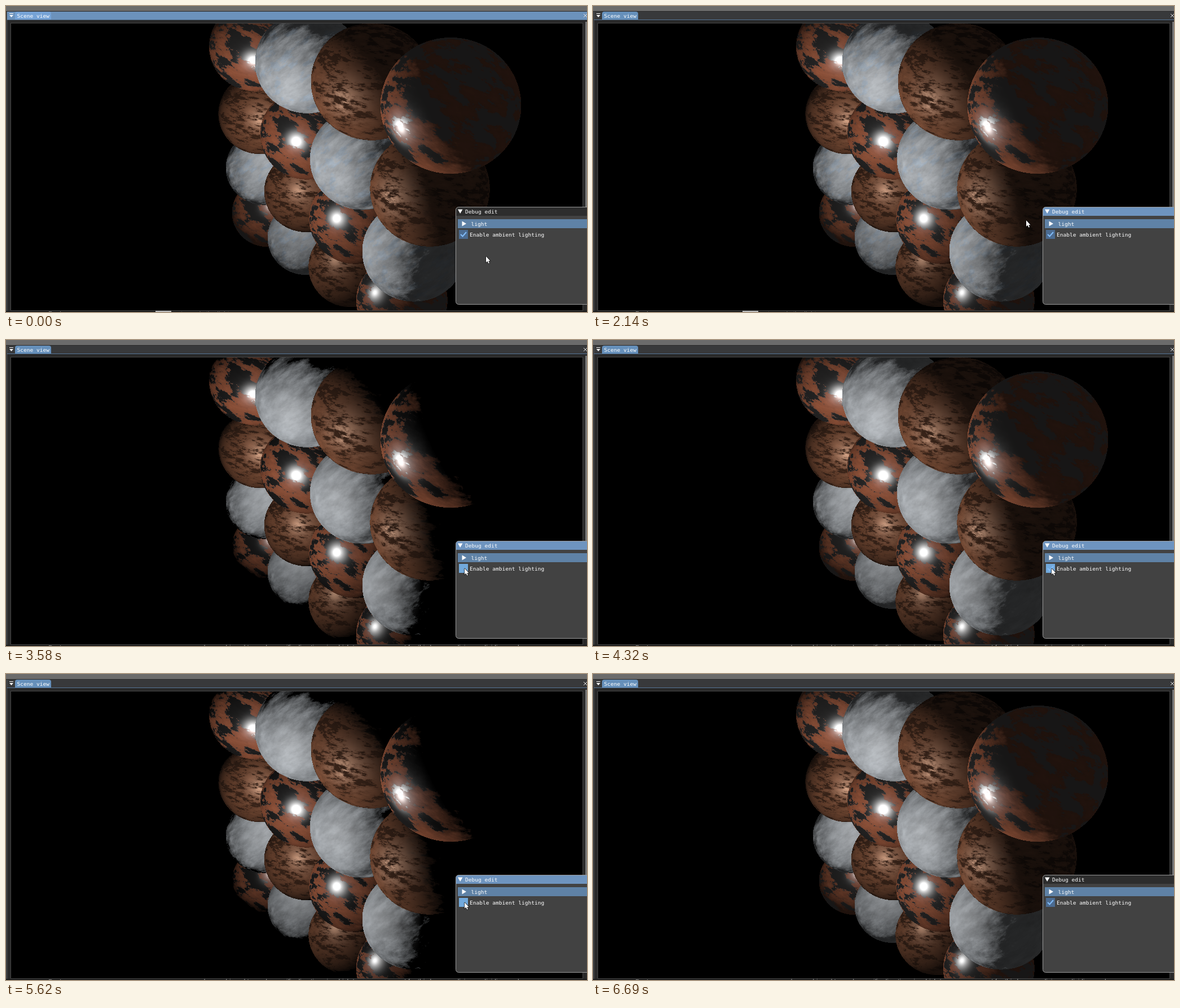
These frames come from a looping animation (1030x544 px, 6790 ms). An HTML page with a canvas:

```html
<!DOCTYPE html>
<html lang="en">
<head>
<meta charset="utf-8">
<title>Scene view</title>
<style>
html, body { margin: 0; width: 100%; height: 100%; overflow: hidden; background: #000; }
canvas { display: block; }
</style>
</head>
<body>
<canvas id="stage" width="1030" height="544"></canvas>
<script>
const W = 1030, H = 544, LOOP = 6790;
const VIEW = { left: 9, top: 31, right: 1022, bottom: 541 };
const ctx = document.getElementById('stage').getContext('2d');

// ---------- noise ----------
function hash(x, y, z) {
  let h = Math.imul(x, 374761393) + Math.imul(y, 668265263) + Math.imul(z, 1274126177) | 0;
  h = Math.imul(h ^ h >>> 13, 1274126177);
  return ((h ^ h >>> 16) >>> 0) / 4294967296;
}
const mix = (a, b, k) => a + (b - a) * k;
const clamp = v => Math.min(1, Math.max(0, v));
const smooth = (a, b, v) => { const k = clamp((v - a) / (b - a)); return k * k * (3 - 2 * k); };

function noise(x, y, z) {
  const i = Math.floor(x), j = Math.floor(y), k = Math.floor(z);
  const u = smooth(0, 1, x - i), v = smooth(0, 1, y - j), w = smooth(0, 1, z - k);
  const row = (b, c) => mix(hash(i, b, c), hash(i + 1, b, c), u);
  const slab = c => mix(row(j, c), row(j + 1, c), v);
  return mix(slab(k), slab(k + 1), w);
}
function fbm(x, y, z, octaves) {
  let sum = 0, amp = 0.5, total = 0;
  for (let o = 0; o < octaves; o++) {
    sum += amp * noise(x, y, z);
    total += amp;
    amp *= 0.64;
    x = x * 2.03 + 7; y = y * 2.03 + 3; z = z * 2.03 + 5;
  }
  return sum / total;
}

// ---------- materials ----------
const linear = (...rgb) => rgb.map(v => (v / 255) ** 2.2);
const RUST = linear(150, 86, 60), METAL = linear(112, 109, 108);
const BROWN = linear(122, 77, 54), STONE = linear(188, 193, 198), TAN = linear(235, 190, 160);
const white = v => [v, v, v];

// Each material gives base colour, diffuse factor, bump and specular at a point;
// nh is the cosine to the highlight direction.
function rustedMetal(nx, ny, nz, nh, seed) {
  const u = nx * .87 + ny * .5, v = ny * .87 - nx * .5;
  const patch = fbm(u * 2.6 + 4 + seed, v * 6.5 + 9, nz * 3 + 2, 7);
  const rust = smooth(.485, .53, patch + .09 * smooth(.5, .75, ny));
  const shine = nh ** 70 * mix(1.3, .35, rust) + .1 * nh ** 20 * patch + nh ** 300;
  return {
    base: RUST.map((c, i) => mix(METAL[i], c * (.4 + 1.1 * patch), rust)),
    diffuse: mix(.07, 1, rust), bump: (patch - .5) * .6, spec: white(shine), tint: 0
  };
}
function brownRust(nx, ny, nz, nh, seed) {
  const u = nx * .98 + ny * .17, v = ny * .98 - nx * .17;
  const grain = fbm(u * 5 + 20 + seed, v * 14 + 5, nz * 5, 6);
  const soot = smooth(.51, .6, grain - .05 * ny);
  const shine = (.25 * nh ** 16 + .45 * nh ** 100) * smooth(.62, .4, grain);
  return {
    base: BROWN.map(c => c * mix(1.7 - 1.6 * grain, .25, soot)),
    diffuse: 1, bump: (grain - .5) * .6, spec: TAN.map(c => c * shine), tint: 0
  };
}
function paleStone(nx, ny, nz, nh, seed) {
  const u = nx * .8 - ny * .6, v = ny * .8 + nx * .6;
  const streak = fbm(u * 3 + 30 + seed, v * 7 + 11, nz * 4, 6);
  return {
    base: STONE.map(c => c * (.5 + .8 * streak)), diffuse: 1, bump: (streak - .5) * 1.1,
    spec: white(.1 * nh ** 10), tint: smooth(.52, .66, fbm(u * 4 + 50, v * 9, nz * 4, 4))
  };
}
const MATERIALS = [rustedMetal, brownRust, paleStone];

// ---------- a 4 x 4 wall of spheres in perspective ----------
// The lamp's highlight drifts left over the columns and up over the rows.
function sphereAt(col, row) {
  const depth = 1 - .0888 * col + .1186 * row;
  const rx = (82 + 3.2 * col + row - .7 * col * row) / depth;
  return {
    cx: (442 + 45.5 * col + 62 * row) / depth,
    cy: (72 + 19.3 * col + (142 + 1.6 * col) * row) / depth,
    rx, ry: rx * .97,
    hx: -.05 - .22 * col + .04 * row,
    hy: .33 - .17 * row,
    power: .86 - .045 * row * row,
    seed: row * .13 + col * .21,
    material: MATERIALS[(row + 2 * col) % 3]
  };
}

// Three lightings share one pass.
const LIGHTINGS = {
  cool: { ambient: .03, tint: .045 }, unlit: { ambient: 0, tint: 0 }, lit: { ambient: .03, tint: 0 }
};
for (const lighting of Object.values(LIGHTINGS)) lighting.image = new ImageData(W, H);

function renderSphere({ cx, cy, rx, ry, hx, hy, power, seed, material }) {
  const hz = Math.sqrt(1 - hx * hx - hy * hy);
  const lx = 2 * hz * hx, ly = 2 * hz * hy, lz = 2 * hz * hz - 1;
  const x1 = Math.min(VIEW.right, cx + rx), y1 = Math.min(VIEW.bottom, cy + ry);
  for (let y = Math.max(VIEW.top, Math.floor(cy - ry)); y < y1; y++)
  for (let x = Math.floor(cx - rx); x < x1; x++) {
    const at = (y * W + x) * 4;
    if (LIGHTINGS.lit.image.data[at + 3]) continue;
    const nx = (x + .5 - cx) / rx, ny = (y + .5 - cy) / ry, rr = nx * nx + ny * ny;
    if (rr >= 1) continue;
    const nz = Math.sqrt(1 - rr);
    const m = material(nx, ny, nz, Math.max(0, nx * hx + ny * hy + nz * hz), seed);
    const facing = nx * lx + ny * ly + nz * lz - .06;
    const diffuse = clamp(facing + m.bump * smooth(1, 0, facing)) ** 1.25 * m.diffuse;
    const glint = smooth(0, .15, facing);
    for (const { ambient, tint, image } of Object.values(LIGHTINGS)) {
      for (let c = 0; c < 3; c++) {
        const value = m.base[c] * (ambient + power * diffuse) + m.spec[c] * power * glint;
        image.data[at + c] = 255 * clamp(value) ** (1 / 2.2) * (1 + (c - 1) * tint * m.tint);
      }
      image.data[at + 3] = 255;
    }
  }
}
// Nearest first: right columns, then upper rows.
for (let col = 3; col >= 0; col--)
  for (let row = 0; row < 4; row++) renderSphere(sphereAt(col, row));

for (const lighting of Object.values(LIGHTINGS)) {
  lighting.layer = document.createElement('canvas');
  lighting.layer.width = W;
  lighting.layer.height = H;
  lighting.layer.getContext('2d').putImageData(lighting.image, 0, 0);
}

// ---------- timeline ----------
// Each click toggles ambient lighting on release.
const CLICKS = [[2850, 2910], [3580, 3640], [4320, 4440], [5620, 5680]];
const MOVES = [
  { from: 680, to: 960, x: 812, y: 400 },
  { from: 1380, to: 1490, x: 811, y: 407 },
  { from: 1800, to: 2140, x: 768, y: 381 },
  { from: 2140, to: 2440, x: 812, y: 404 },
  { from: 2500, to: 2610, x: 813, y: 406 },
  { from: 5740, to: 5910, x: 953, y: 499 },
  { from: 6090, to: 6450, x: 1003, y: 546 }
];
function pointerAt(t) {
  let x = 851, y = 445;
  for (const move of MOVES) {
    const k = smooth(move.from, move.to, t);
    x = mix(x, move.x, k);
    y = mix(y, move.y, k);
  }
  return { x: Math.round(x), y: Math.round(y) };
}
function stateAt(t) {
  const clicks = CLICKS.filter(([, release]) => t >= release).length;
  return {
    pointer: pointerAt(t),
    checked: clicks % 2 === 0,
    pressed: CLICKS.some(([press, release]) => t >= press && t < release),
    lighting: clicks === 0 ? LIGHTINGS.cool : clicks % 2 ? LIGHTINGS.unlit : LIGHTINGS.lit,
    sceneFocused: t < 280,
    debugFocused: t >= 350 && t < 6630,
    scrolled: t >= 3150
  };
}

// ---------- interface ----------
function box(color, x, y, w, h) { ctx.fillStyle = color; ctx.fillRect(x, y, w, h); }
function trace(points) {
  ctx.beginPath();
  points.forEach(([x, y]) => ctx.lineTo(x, y));
}
function shape(color, points) {
  ctx.fillStyle = color;
  trace(points);
  ctx.fill();
}
function stroke(color, width, points) {
  ctx.strokeStyle = color;
  ctx.lineWidth = width;
  trace(points);
  ctx.stroke();
}
function text(content, x, y, color = '#fff', font = '9.55px "DejaVu Sans Mono", monospace') {
  ctx.font = font;
  ctx.fillStyle = color;
  ctx.fillText(content, x, y);
}
const inside = ({ x, y }, left, top, w, h) => x >= left && x < left + w && y >= top && y < top + h;

function drawSceneWindow({ sceneFocused, lighting }) {
  box('#292929', 0, 0, W, H);
  box('#6b6b6b', 0, 0, W, 9);
  box(sceneFocused ? '#6c92bb' : '#38393b', 2, 10, W, 14);
  ctx.fillStyle = sceneFocused ? '#76a3d6' : '#6690bb';
  ctx.beginPath();
  ctx.roundRect(16, 10, 64, 14, [4, 4, 0, 0]);
  ctx.fill();
  box('#567597', 2, 24, W, 1);
  box('#55595e', 1, 10, 1, 532);
  box('#fff', 6, 13, 7, 1);
  shape('#fff', [[6, 16], [13, 16], [9.5, 20]]);
  text('Scene view', 19.5, 20.5);
  stroke('#ddd', 1, [[1024, 14], [1030, 20]]);
  stroke('#ddd', 1, [[1024, 20], [1030, 14]]);
  box('#454545', 8, 30, 1015, 512);
  box('#000', VIEW.left, VIEW.top, VIEW.right - VIEW.left, VIEW.bottom - VIEW.top);
  box('#777', 1027, 28, 3, 330);
  ctx.drawImage(lighting.layer, 0, 0);
}

// Tops of page text peeking out under the window.
function drawPageEdge({ scrolled }) {
  const font = '11.8px "Liberation Sans", sans-serif';
  ctx.save();
  ctx.beginPath();
  ctx.rect(0, 542, W, 2);
  ctx.clip();
  box('#1b1b1b', 0, 542, W, 2);
  text('Back', 75, 551, '#999', font);
  if (scrolled) {
    text('samples are biased towards specific directions in which to use we account for this by normalizing or dividing each', 322, 550, '#999', font);
  } else {
    box('#bbb', 265, 542, 28, 2);
    text('towards the light', 310, 551, '#777', font);
  }
  ctx.restore();
}

function drawDebugWindow({ debugFocused, pointer, pressed, checked }) {
  ctx.beginPath();
  ctx.roundRect(797.5, 357.5, 300, 173, 5);
  ctx.save();
  ctx.clip();
  box('#424242', 797, 357, 300, 175);
  box(debugFocused ? '#6e94bf' : '#2d2d2d', 797, 357, 300, 16);
  ctx.restore();
  ctx.strokeStyle = '#999';
  ctx.lineWidth = 1;
  ctx.stroke();
  shape('#fff', [[801, 361.5], [809.5, 361.5], [805.2, 369]]);
  text('Debug edit', 814, 368.5);

  box(inside(pointer, 801, 379, 229, 16) ? '#6f9bc9' : '#5f82a6', 801, 379, 229, 16);
  shape('#fff', [[808.5, 382.5], [816, 387], [808.5, 391.5]]);
  text('light', 824.5, 390.5);

  const hovered = inside(pointer, 803, 398, 151, 16);
  box(pressed ? '#72a9dc' : hovered ? '#5f8bb8' : '#4b6b91', 803, 398, 16, 16);
  if (checked) stroke('#82bcf8', 2, [[806, 406], [809.5, 409.5], [816, 402]]);
  text('Enable ambient lighting', 822, 409.5);
}

function drawPointer({ pointer }) {
  ctx.save();
  ctx.translate(pointer.x, pointer.y);
  const outline = [[0, 0], [0, 11], [2.5, 8.8], [4.3, 12.7], [6, 12], [4.3, 8.2], [7.6, 8.2], [0, 0]];
  stroke('#000', 1.2, outline);
  shape('#fff', outline);
  ctx.restore();
}

const start = performance.now();
function tick() {
  const state = stateAt((performance.now() - start) % LOOP);
  drawSceneWindow(state);
  drawPageEdge(state);
  drawDebugWindow(state);
  drawPointer(state);
  requestAnimationFrame(tick);
}
tick();
</script>
</body>
</html>
```
